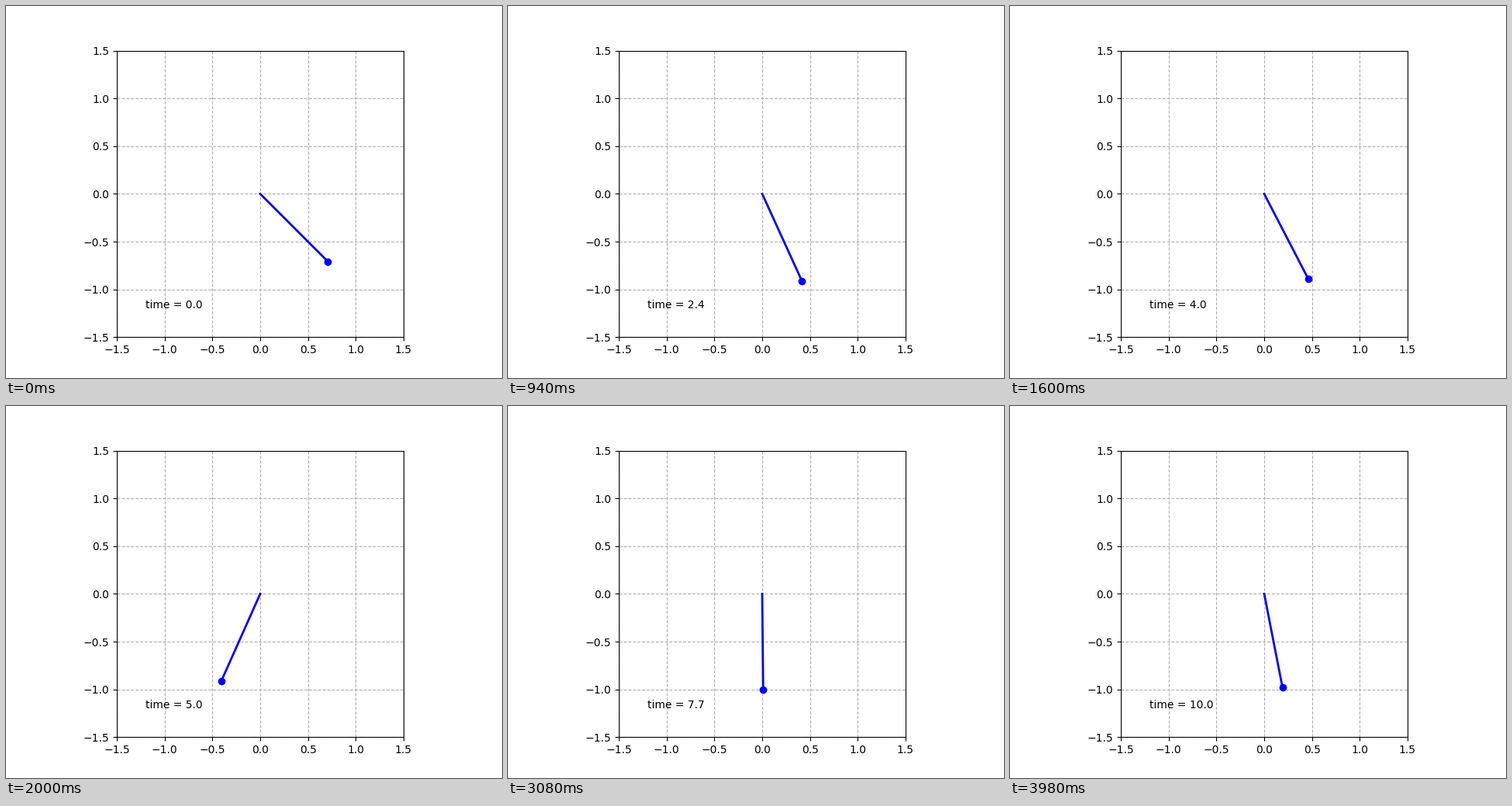
Recreate the animation shown at these times as a matplotlib script. Size 640 px wide and 480 px high, loop 4000 ms.

```python
import numpy as np
import matplotlib.pyplot as plt
from matplotlib.animation import FuncAnimation

G, LENGTH, DAMPING = 9.8, 1.0, 0.2
DT, FRAMES, SUBSTEPS = 0.05, 200, 10


def deriv(state):
    theta, omega = state
    return np.array([omega, -G / LENGTH * np.sin(theta) - DAMPING * omega])


def rk4(state, h):
    k1 = deriv(state)
    k2 = deriv(state + h / 2 * k1)
    k3 = deriv(state + h / 2 * k2)
    k4 = deriv(state + h * k3)
    return state + h / 6 * (k1 + 2 * k2 + 2 * k3 + k4)


def solve():
    state = np.array([np.pi / 4, 0.0])
    angles = []
    for _ in range(FRAMES):
        angles.append(state[0])
        for _ in range(SUBSTEPS):
            state = rk4(state, DT / SUBSTEPS)
    return np.array(angles)


theta = solve()
xs, ys = LENGTH * np.sin(theta), -LENGTH * np.cos(theta)

fig, ax = plt.subplots(figsize=(6.4, 4.8), dpi=100)
ax.set(xlim=(-1.5, 1.5), ylim=(-1.5, 1.5), aspect="equal")
ax.grid(linestyle="--")

rod, = ax.plot([], [], "b-", lw=2)
bob, = ax.plot([], [], "bo", ms=6)
label = ax.text(0.1, 0.1, "", transform=ax.transAxes)


def update(i):
    rod.set_data([0, xs[i]], [0, ys[i]])
    bob.set_data([xs[i]], [ys[i]])
    label.set_text(f"time = {i * DT:.1f}")
    return rod, bob, label


anim = FuncAnimation(fig, update, frames=FRAMES, interval=20,
                     init_func=lambda: update(0), blit=True, repeat=True)
plt.show()
```
